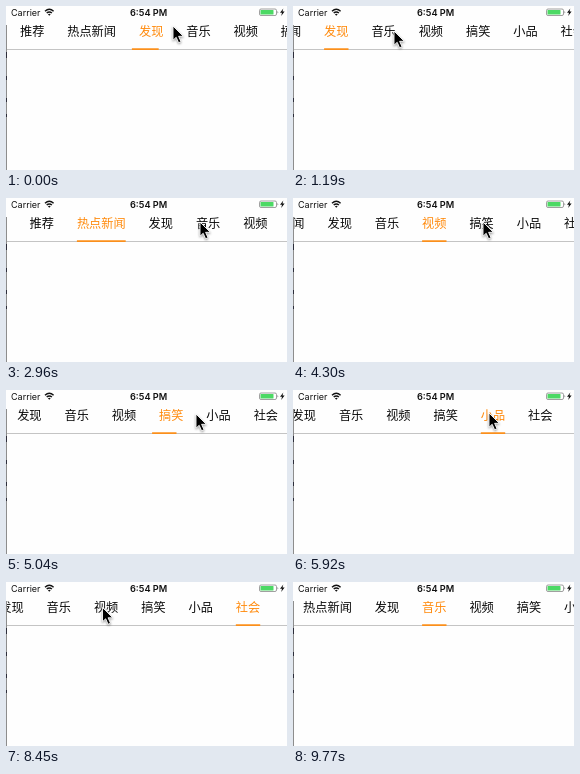
These frames come from a looping animation (281x164 px, 9800 ms). An HTML page:

```html
<!DOCTYPE html>
<html lang="zh">
<head>
<meta charset="utf-8">
<style>
  html, body { margin: 0; width: 100%; height: 100%; overflow: hidden; background: #fff; }
  svg { display: block; width: 281px; height: 164px; }
  .status { font: 9px Inter, "Liberation Sans", sans-serif; fill: #111; }
  .time { font-weight: 600; font-size: 9.2px; text-anchor: middle; }
  .tab { font: 12.2px "Noto Sans CJK SC", "Noto Sans CJK", sans-serif; fill: #0a0a0a; }
  .tab.on { fill: #ff8a0c; }
  #cursor { filter: drop-shadow(0 1px .8px rgba(0, 0, 0, .4)); }
</style>
</head>
<body>
<svg viewBox="0 0 281 164">
  <rect width="281" height="164" fill="#fefefe"/>
  <rect y="43" width="281" height="1" fill="#c4c4c4"/>
  <g id="strip"><rect id="bar" y="42.3" height="1.6" fill="#ff8a0c"/></g>
  <g class="status">
    <text x="5" y="9.6">Carrier</text>
    <text class="time" x="142.6" y="9.6">6:54 PM</text>
  </g>
  <path d="M39 5.2Q43.3 1.2 47.6 5.2M40.7 7.1Q43.3 4.7 45.9 7.1" fill="none" stroke="#111" stroke-width="1.4"/>
  <path d="M41.9 8.3Q43.3 7.2 44.7 8.3L43.3 9.8Z" fill="#111"/>
  <rect x="253.5" y="3" width="17" height="6.5" rx="1.5" fill="#fff" stroke="#777" stroke-width=".7"/>
  <rect x="254.5" y="3.9" width="13" height="4.7" rx=".6" fill="#4cd964"/>
  <path d="M271.6 5Q273 6.2 271.6 7.5Z" fill="#555"/>
  <path d="M277.3 2.4L274 6.8H276L275.2 10L278.6 5.5H276.5Z" fill="#111"/>
  <rect y="19" width="1" height="145" fill="#8d8d8d"/>
  <path d="M.5 46V52M.5 70V74M.5 92V96M.5 108V111" stroke="#2d2d3a"/>
  <path id="cursor" d="M0 0V14.2L3.2 11.3L5.6 16.8L8 15.7L5.6 10.3H10.3Z" fill="#000" stroke="#fff" stroke-width=".9"/>
</svg>
<script>
const LOOP = 9800, STEP = 148.1;
const CHAR = 12.2, GAP = 22.9, WIDTH = 281, MIDDLE = 141.3, MAX_SCROLL = 144;
const $ = id => document.getElementById(id);
const strip = $('strip'), bar = $('bar'), cursor = $('cursor');

const clamp = (v, lo = 0, hi = 1) => Math.min(hi, Math.max(lo, v));
const mix = (a, b, p) => a + (b - a) * p;
const easeOut = p => Math.sin(p * Math.PI / 2);
const limit = pos => clamp(pos, 0, MAX_SCROLL);

let left = 23.6;
const tabs = ['推荐', '热点新闻', '发现', '音乐', '视频', '搞笑', '小品', '社会'].map(name => {
  const el = document.createElementNS('http://www.w3.org/2000/svg', 'text');
  const tab = { el, x: left, w: name.length * CHAR };
  el.textContent = name;
  el.setAttribute('x', left);
  el.setAttribute('y', 30.2);
  strip.insertBefore(el, bar);
  left += tab.w + GAP;
  return tab;
});

// Gestures, timed in steps.
const tap = (at, name, x, y) =>
  ({ tab: tabs.find(t => t.el.textContent === name), arrive: at - 1, start: at, end: at, x, y, toX: x });
const drag = (start, end, x, toX, y) => ({ arrive: start, start, end, x, toX, y });

const gestures = [
  tap(-9, '热点新闻', 95, 20),
  tap(-1.43, '发现', 167, 20),
  drag(2, 6, 199, 101, 25),
  drag(8, 13, 101, 225, 25),
  tap(16, '热点新闻', 95, 25),
  tap(20.5, '音乐', 194, 24),
  tap(26.7, '视频', 190, 24),
  tap(32.7, '搞笑', 190, 24),
  tap(37.5, '小品', 196, 23),
  tap(43, '社会', 242, 25),
  drag(45.5, 49, 224, 139, 26),
  drag(53.5, 55.5, 170, 135, 26),
  tap(59, '音乐', 58, 25),
  drag(64, 64, 236, 236, 170)
];

// Scrolling past either end meets growing resistance.
function rubber(pos) {
  const over = pos - limit(pos);
  return limit(pos) + Math.sign(over) * WIDTH * (1 - 1 / (Math.abs(over) * .55 / WIDTH + 1));
}

function dragX(g, n) {
  return g.end > g.start ? mix(g.x, g.toX, clamp((n - g.start) / (g.end - g.start))) : g.x;
}

function scrollAt(n) {
  let pos = 0;
  for (const g of gestures) {
    if (n < g.start) break;
    if (g.tab) {
      const goal = limit(g.tab.x + g.tab.w / 2 - MIDDLE);
      pos = mix(pos, goal, clamp((n - g.start) / 2));
    } else {
      pos = rubber(pos + g.x - dragX(g, n));
      pos = mix(pos, limit(pos), easeOut(clamp((n - g.end) / 3)));
    }
  }
  return pos;
}

function pointerAt(n) {
  const i = gestures.findIndex(g => g.arrive > n);
  const g = gestures[i < 0 ? gestures.length - 1 : i - 1];
  const x = dragX(g, n), next = gestures[i];
  if (!next) return [x, g.y];
  const begin = Math.max(g.end, next.arrive - 2);
  const p = clamp((n - begin) / (next.arrive - begin || 1));
  return [mix(x, next.x, p), mix(g.y, next.y, p)];
}

function draw(now) {
  const n = Math.floor((now % LOOP + 5) / STEP);
  const [to, from] = gestures.filter(g => g.tab && g.start <= n).reverse();
  const p = easeOut(clamp((n - to.start) / 2));

  tabs.forEach(t => t.el.setAttribute('class', t === to.tab ? 'tab on' : 'tab'));
  bar.setAttribute('x', mix(from.tab.x, to.tab.x, p));
  bar.setAttribute('width', mix(from.tab.w, to.tab.w, p));
  strip.setAttribute('transform', `translate(${-scrollAt(n)} 0)`);
  cursor.setAttribute('transform', `translate(${pointerAt(n)})`);
}

let start;
function tick(now) {
  start ??= now;
  draw(now - start);
  requestAnimationFrame(tick);
}
draw(0);
requestAnimationFrame(tick);
</script>
</body>
</html>
```
